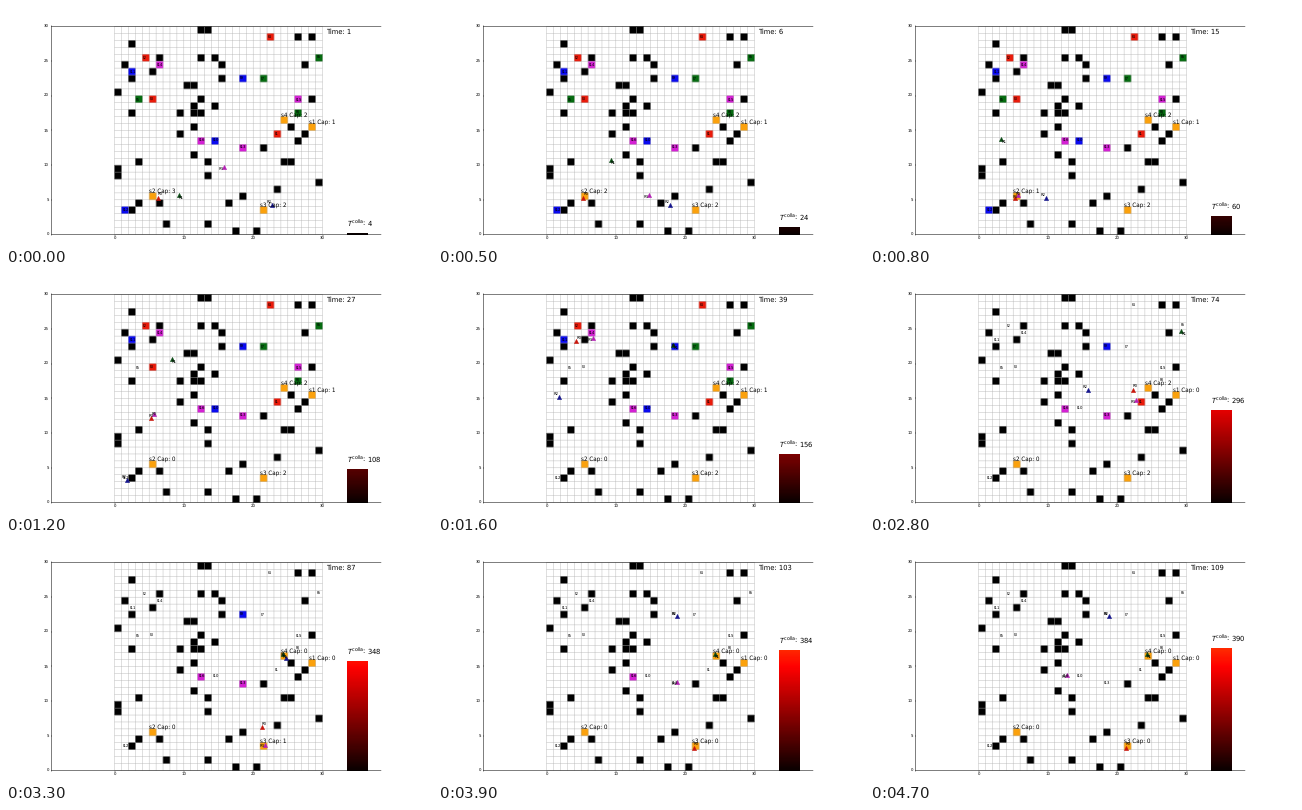
Write a matplotlib script that moves like this. It is 426 by 240 pixels and loops after 4.8 s.

```python
import matplotlib.pyplot as plt
import numpy as np
from matplotlib.animation import FuncAnimation
from matplotlib.patches import Rectangle

W, H, DPI = 426, 240, 96
FRAMES, INTERVAL = 48, 100
N = 30                   # grid cells per side
CELL = 208 / N           # pixels per cell
X0, Y0 = 108.5, 228.5    # pixel position of the grid's lower left corner
LEFT, RIGHT, TOP = 45.5, 375.0, 20.5
BAR_SCALE = 0.0453       # bar height in cells per unit of cost
STEPS, CLOCK_END = 110, 109
SERVICE = 2              # least stay at a store, in steps

RED, GREEN, BLUE, MAGENTA = "#ea1a0a", "#056b10", "#0a0af0", "#d420d4"
ORANGE = "#fba10c"

# Blocked cells: row -> columns
WALLS = {
    29: (12, 13), 28: (26, 28), 27: (2,), 25: (6, 12, 14), 24: (1, 15, 27),
    23: (5,), 22: (2, 15), 21: (10, 11), 20: (0,), 19: (12, 28),
    18: (11, 14), 17: (2, 9, 11, 12), 15: (11, 25), 14: (9, 27), 13: (26,),
    12: (21,), 11: (11,), 10: (3, 13, 24, 25), 9: (0,), 8: (0, 13),
    7: (29,), 6: (23,), 5: (18,), 4: (3, 6, 16), 3: (2,), 1: (7, 13),
    0: (17, 20),
}
BLOCKED = {(x, y) for y, xs in WALLS.items() for x in xs}

TASKS = {
    RED: [(23, 14), (4, 25), (5, 19), (22, 28)],
    GREEN: [(3, 19), (29, 25), (21, 22), (26, 17)],
    BLUE: [(18, 22), (14, 13), (2, 23), (1, 3)],
    MAGENTA: [(18, 12), (6, 24), (26, 19), (12, 13)],
}
TASK_CELLS = [cell for cells in TASKS.values() for cell in cells]
STORES = {"s1": (28, 15), "s2": (5, 5), "s3": (21, 3), "s4": (24, 16)}
PLACES = {f"t{k}": cell for k, cell in enumerate(TASK_CELLS, 1)} | STORES

# Robots: colour, marker side, start, stops (a bare cell is only passed)
ROBOTS = [
    ("#c8140a", (-1, -1), (6, 5),
     ["s2", "t3", "t2", "t4", "t1", (21, 6), "s3"]),
    ("#0a4a14", (-1, 1), (9, 5),
     [(3, 13), "t5", "t7", "s1", "t8", "t6", "s4"]),
    ("#14148c", (1, -1), (22, 4),
     ["s2", "t12", "t11", "t10", "s4", "t9"]),
    ("#b41eb4", (1, 1), (15, 9),
     ["s2", "t14", "t15", (22, 14), "s3", "t13", "t16"]),
]


def neighbours(cell):
    x, y = cell
    for nx, ny in ((x, y + 1), (x, y - 1), (x + 1, y), (x - 1, y)):
        if 0 <= nx < N and 0 <= ny < N and (nx, ny) not in BLOCKED:
            yield nx, ny


def find_path(start, goal):
    """Shortest way around the walls, vertical moves first."""
    dist, edge = {goal: 0}, [goal]
    while start not in dist:
        edge = [(n, c) for c in edge for n in neighbours(c)]
        for n, c in edge:
            dist.setdefault(n, dist[c] + 1)
        edge = list(dict.fromkeys(n for n, c in edge if dist[n] > dist[c]))
    path = []
    while start != goal:
        start = min(neighbours(start), key=lambda n: dist.get(n, np.inf))
        path.append(start)
    return path


class Robot:
    def __init__(self, start, stops):
        self.cell, self.stops = start, list(stops)
        self.path, self.store, self.ready = [], None, 0

    def active(self, now):
        return bool(self.stops) or now <= self.ready

    def move(self, now, world):
        """Go one cell on; at a store, wait until it has been emptied."""
        if self.store:
            emptied = world["emptied"].get(self.store, np.inf)
            if now <= max(self.ready, emptied + 1):
                return
            self.store = None
        if not self.stops:
            return
        stop = self.stops[0]
        if not self.path:
            self.path = find_path(self.cell, PLACES.get(stop, stop))
        self.cell = self.path.pop(0)
        if not self.path:
            self.arrive(self.stops.pop(0), now, world)

    def arrive(self, stop, now, world):
        self.ready = now
        if stop in STORES:
            world["caps"][stop] -= 1
            if world["caps"][stop] == 0:
                world["emptied"][stop] = now
            self.store, self.ready = stop, now + SERVICE
        elif stop in PLACES:
            world["done"].add(stop)


def simulate():
    team = [Robot(start, stops) for _, _, start, stops in ROBOTS]
    # Every store holds one unit for each planned visit
    caps = {s: sum(s in r.stops for r in team) for s in STORES}
    world = {"caps": caps, "emptied": {}, "done": set()}
    cost, states = 0, [None]
    for now in range(1, STEPS + 1):
        if now > 1:
            for robot in team:
                robot.move(now, world)
        cost += sum(robot.active(now) for robot in team)
        states.append(([r.cell for r in team], set(world["done"]),
                       dict(caps), cost))
    return states


STATES = simulate()


def step_at(frame):
    return int(round(np.interp(frame, [3.25, 28, 41.6], [1, 74, STEPS])))


def px(n):
    """Pixels to points."""
    return n * 72 / DPI


plt.rcParams.update({"font.family": "DejaVu Sans", "text.hinting": "none",
                     "mathtext.fontset": "dejavusans"})
fig = plt.figure(figsize=(W / DPI, H / DPI), dpi=DPI, facecolor="white")
ax = fig.add_axes([LEFT / W, 1 - Y0 / H, (RIGHT - LEFT) / W, (Y0 - TOP) / H])

BAR_X, BAR_W, BAR_Y, BAR_MAX = 33.5, 3, -0.1, 20
ramp = np.linspace(0, BAR_MAX / BAR_SCALE, 200)[:, None]
bar = ax.imshow(ramp, cmap="hot", vmin=0, vmax=900, origin="lower",
                aspect="auto", zorder=1,
                extent=(BAR_X, BAR_X + BAR_W, BAR_Y, BAR_MAX))

ax.set_xlim((LEFT - X0) / CELL, (RIGHT - X0) / CELL)
ax.set_ylim(0, N)
ax.set_xticks(range(0, N + 1, 10))
ax.set_yticks(range(0, N + 1, 5))
ax.tick_params(length=px(1.4), pad=px(1.2), width=px(0.45),
               labelsize=px(3.9))
for spine in ax.spines.values():
    spine.set(linewidth=px(0.5), snap=False)
ax.spines["right"].set_visible(False)

lines = np.arange(N + 1)
style = dict(colors="#b0b0b0", linewidths=px(0.4), zorder=1.5, snap=False)
ax.vlines(lines, 0, N, **style)
ax.hlines(lines, 0, N, **style)


def square(cell, color):
    return ax.add_patch(Rectangle(cell, 1, 1, color=color, lw=px(0.5),
                                  snap=False, zorder=1))


def label(x, y, size, text="", **kw):
    return ax.text(x, y, text, fontsize=px(size), zorder=4, **kw)


for cell in BLOCKED:
    square(cell, "black")

tasks = {}
for color, cells in TASKS.items():
    for x, y in cells:
        name = f"t{len(tasks) + 1}"
        tasks[name] = square((x, y), color)
        label(x + 0.15, y + 0.32, 3.9, name)

stores = {}
for name, (x, y) in STORES.items():
    square((x, y), ORANGE)
    stores[name] = label(x, y + 1, 5.6)

markers = []
for k, (color, side, *_) in enumerate(ROBOTS):
    mark, = ax.plot([], [], "^", color=color, ms=px(4.2), mew=px(0.5),
                    zorder=3)
    tag = label(0, 0, 3.8, f"R{k}", ha="center", va="center")
    markers.append((mark, tag, np.array(side)))

clock = label(30.5, 29, 6.7)
cost_text = label(BAR_X, 1, 6.7)


def update(frame):
    step = step_at(frame)
    cells, done, caps, _ = STATES[step]
    shown = min(step, CLOCK_END)
    cost = STATES[shown][-1]

    clock.set_text(f"Time: {shown}")
    height = cost * BAR_SCALE
    bar.set_clip_path(Rectangle((BAR_X, BAR_Y), BAR_W, height - BAR_Y,
                                transform=ax.transData))
    cost_text.set_text(r"$T^{\mathrm{colla}}$: " + str(cost))
    cost_text.set_y(height + 1)

    for name, patch in tasks.items():
        patch.set_visible(name not in done)
    for name, text in stores.items():
        text.set_text(f"{name} Cap: {caps[name]}")
    for cell, (mark, tag, side) in zip(cells, markers):
        center = np.array(cell) + 0.5
        mx, my = center + 0.25 * side
        mark.set_data([mx], [my])
        tag.set_position(center - 0.15 * side)
    return []


anim = FuncAnimation(fig, update, frames=FRAMES, interval=INTERVAL,
                     init_func=lambda: update(0), repeat=True, repeat_delay=0)
plt.show()
```
